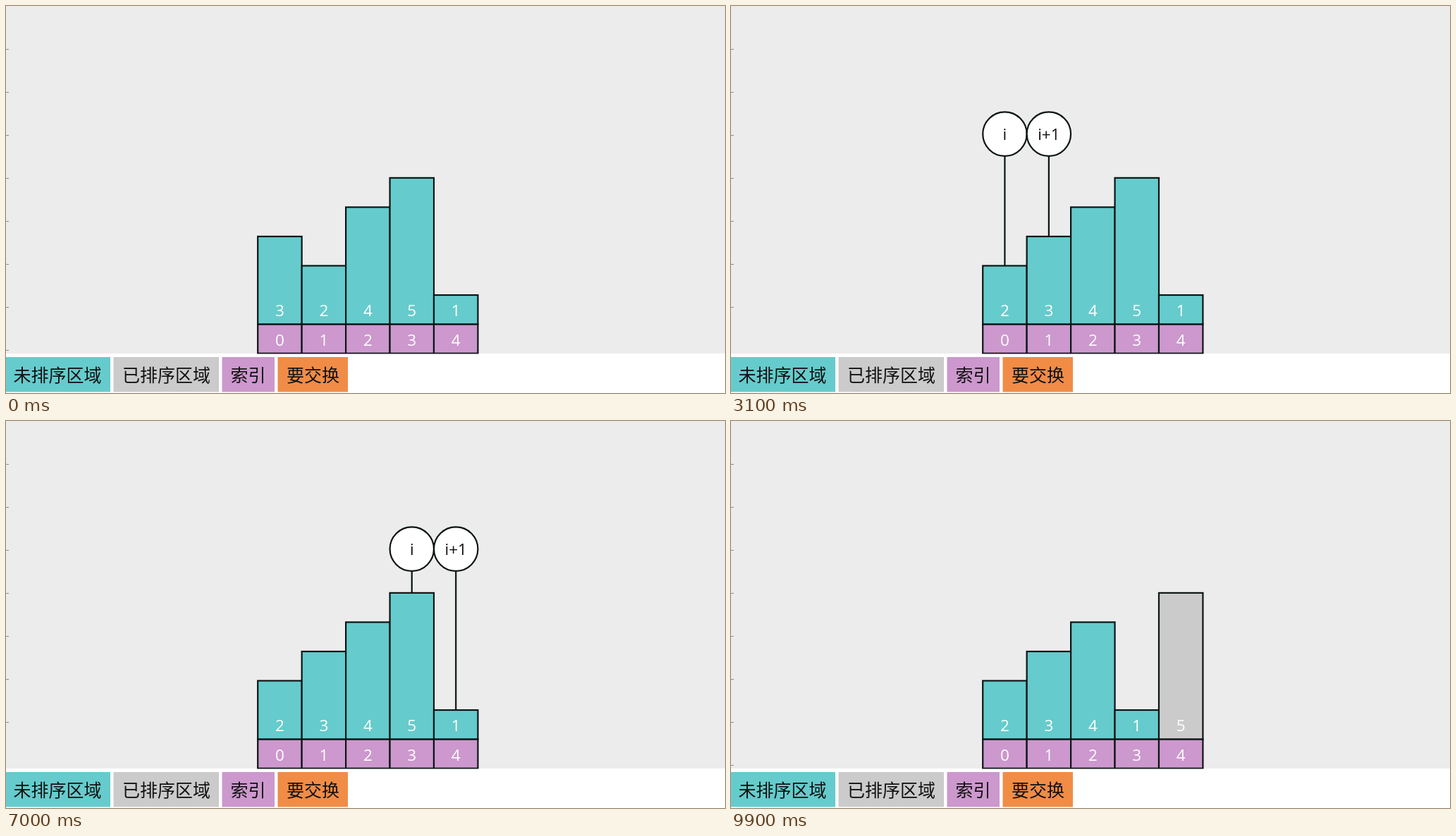
Recreate the animation shown at these times as an HTML page. Size 1020 by 549 pixels, loop 10 s.

```html
<!DOCTYPE html>
<html lang="zh-CN">
<head>
<meta charset="utf-8">
<title>冒泡排序</title>
<style>
  html, body { margin: 0; width: 100%; height: 100%; overflow: hidden; background: #fff; }
  svg { display: block; width: 1020px; height: 549px; }
  text { font: 22.5px "Open Sans", "Noto Sans", sans-serif; text-anchor: middle; fill: #fff; }
  .legend text { font: 25px "Noto Sans CJK SC", "Noto Sans CJK", "Noto Sans CJK JP", sans-serif; fill: #111; }
  .outlined { stroke: #0c1414; stroke-width: 2.2; }
  .pointer text { fill: #111; }
  .tick { stroke: #8c8c8c; stroke-width: 1; }
  .blink { animation: blink 10s step-end infinite; }
  @keyframes blink {
    0%, 40.5%, 70.5% { visibility: visible; }
    30%, 60.5% { visibility: hidden; }
  }
</style>
</head>
<body>
<svg viewBox="0 0 1020 549">
  <rect width="1020" height="493" fill="#ececec"/>
  <g id="ticks"></g>
  <g id="chart"></g>
  <rect y="493.5" width="1020" height="56" fill="#fff"/>
  <g id="legend" class="legend"></g>
</svg>
<script>
const LOOP = 10000, FIRST_STEP = 600, STEP = 1100;
const LEFT = 357.2, CELL = 62.45, BASE = 451.6, UNIT = 41.55;
const TEAL = '#66cbcc', GREY = '#cbcbcb', PURPLE = '#cc98cd', ORANGE = '#f08c46';

const initial = [3, 2, 4, 5, 1], swapped = [2, 3, 4, 5, 1], finished = [2, 3, 4, 1, 5];
const steps = [
  { values: initial },
  { values: initial, i: 0 },
  { values: initial, i: 0, swap: true },
  { values: swapped, i: 0 },
  { values: swapped, i: 1 },
  { values: swapped, i: 2 },
  { values: swapped, i: 3 },
  { values: swapped, i: 3, swap: true },
  { values: finished, i: 3 },
  { values: finished, sorted: 4 }
];

const byId = id => document.getElementById(id);
const centerX = k => LEFT + CELL * (k + 0.5);
const barTop = value => BASE - UNIT * value;
const label = (x, y, s) => `<text x="${x}" y="${y}">${s}</text>`;
const box = (x, y, w, h, fill, cls = '') =>
  `<rect class="${cls}" x="${x}" y="${y}" width="${w}" height="${h}" fill="${fill}"/>`;

function cell(k, y, h, fill, value, baseline) {
  return box(LEFT + CELL * k, y, CELL, h, fill, 'outlined') + label(centerX(k), baseline, value);
}

function pointer(k, value, name) {
  const x = centerX(k);
  return `<g class="pointer"><path class="outlined" d="M${x} 212V${barTop(value)}"/>
    <circle class="outlined" cx="${x}" cy="181.6" r="31.2" fill="#fff"/>${label(x, 190, name)}</g>`;
}

function drawStep({ values, i, swap, sorted }) {
  const color = k => k === sorted ? GREY : swap && (k === i || k === i + 1) ? ORANGE : TEAL;
  let out = values.map((v, k) => cell(k, barTop(v), UNIT * v, color(k), v, 440)).join('');
  out += values.map((_, k) => cell(k, BASE, 41.2, PURPLE, k, 481.5)).join('');
  if (i !== undefined) out += pointer(i, values[i], 'i') + pointer(i + 1, values[i + 1], 'i+1');
  byId('chart').innerHTML = out;
}

byId('ticks').innerHTML = Array.from({ length: 8 }, (_, k) =>
  `<path class="tick${k === 7 ? ' blink' : ''}" d="M0 ${61.5 + 61 * k}h4"/>`).join('');

byId('legend').innerHTML = [
  [0, 148, TEAL, '未排序区域', 73],
  [152.5, 149.5, GREY, '已排序区域', 227.5],
  [306.5, 74.5, PURPLE, '索引', 343.5],
  [385.5, 99.5, ORANGE, '要交换', 435.5]
].map(([x, w, fill, s, mid]) => box(x, 498, w, 49.5, fill) + label(mid, 533, s)).join('');

let shown = -1;
function frame() {
  const t = performance.now() % LOOP;
  const n = Math.max(0, Math.min(steps.length - 1, Math.floor((t - FIRST_STEP) / STEP) + 1));
  if (n !== shown) drawStep(steps[shown = n]);
  requestAnimationFrame(frame);
}
frame();
</script>
</body>
</html>
```
